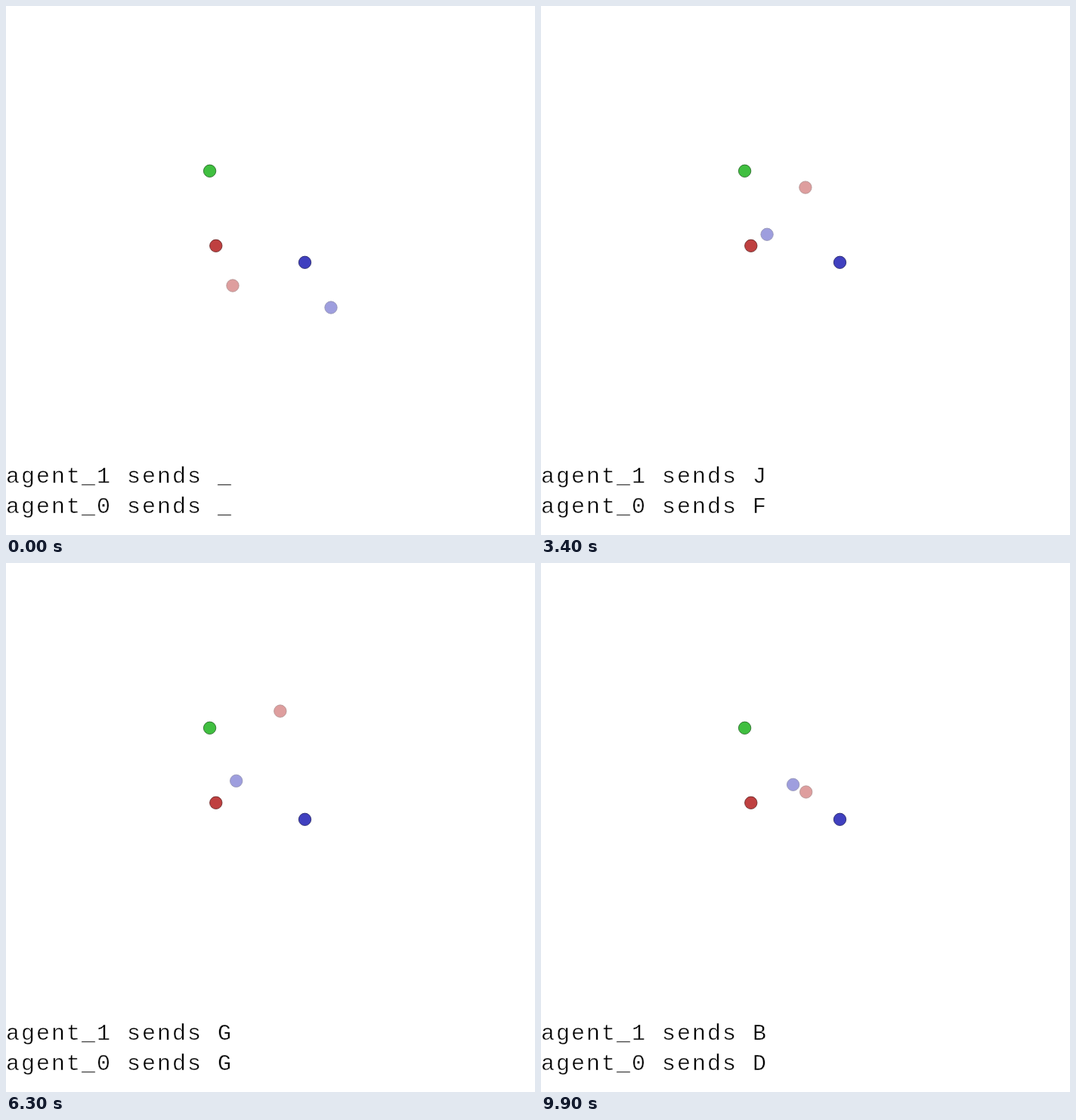
Write an HTML page that moves like this. It is 700 px wide and 700 px high and loops after 10 s.

```html
<!DOCTYPE html>
<html lang="en">
<head>
<meta charset="utf-8">
<title>Agents exchanging letters</title>
<style>
  html, body { margin: 0; width: 100%; height: 100%; overflow: hidden; background: #fff; }
  svg { display: block; width: 100%; height: 100%; }
  .red { fill: #bf4040; stroke: #602020; }
  .green { fill: #40bf40; stroke: #206020; }
  .blue { fill: #4040bf; stroke: #202060; }
  circle { stroke-opacity: .8; }
  .agent { opacity: .5; }
  text {
    font: 30px "Liberation Mono", "Courier New", monospace;
    letter-spacing: 2px;
    white-space: pre;
    /* a white edge thins the letters */
    stroke: #fff;
    stroke-width: .5px;
  }
</style>
</head>
<body>
<svg viewBox="0 0 700 700">
  <circle id="pink" class="red agent" r="8.2"/>
  <circle id="lilac" class="blue agent" r="8.2"/>
  <circle class="red" cx="277.8" cy="317.3" r="8.2"/>
  <circle class="green" cx="269.6" cy="218.3" r="8.2"/>
  <circle class="blue" cx="395.5" cy="339.3" r="8.2"/>
  <text id="line1" y="630.5"></text>
  <text id="line0" y="670.5"></text>
</svg>
<script>
const STEP = 100, STEPS = 100;

// Where each agent rests, and the letters of agent_1 and agent_0 on the way there.
// hop: how far pink rises above its straight way to that place.
const poses = [
  { at: 0, pink: [300, 370], lilac: [430, 399], says: "__" },
  { at: 25, pink: [344.3, 211.5], lilac: [294.5, 319], says: "EG" },
  { at: 43, pink: [355.5, 268.7], lilac: [303.7, 285.5], says: "JF" },
  { at: 55, pink: [369.6, 283], lilac: [315.5, 298.7], says: "DE" },
  { at: 72, pink: [354.8, 247.3], lilac: [291.8, 276], says: "GG", hop: 71 },
  { at: 88, pink: [356.3, 270], lilac: [300.3, 237], says: "CJ" },
  { at: 99, pink: [350.7, 303], lilac: [333.6, 293.3], says: "BD" }
];

const byId = id => document.getElementById(id);
const ease = u => u * u * (3 - 2 * u);

function place(id, from, to, u, lift = 0) {
  const [x, y] = from[id].map((a, axis) => a + (to[id][axis] - a) * ease(u));
  byId(id).setAttribute("cx", x);
  byId(id).setAttribute("cy", y - lift);
}

function draw(step) {
  const i = poses.findIndex(pose => pose.at >= step);
  const to = poses[i], from = poses[Math.max(i - 1, 0)];
  const u = (step - from.at) / (to.at - from.at || 1);

  place("pink", from, to, u, (to.hop || 0) * Math.sin(Math.PI * u));
  place("lilac", from, to, u);
  byId("line1").textContent = "agent_1 sends " + to.says[0];
  byId("line0").textContent = "agent_0 sends " + to.says[1];
}

let start;

function tick(now) {
  start ??= now;
  draw(Math.floor((now - start) / STEP) % STEPS);
  requestAnimationFrame(tick);
}

draw(0);
requestAnimationFrame(tick);
</script>
</body>
</html>
```
